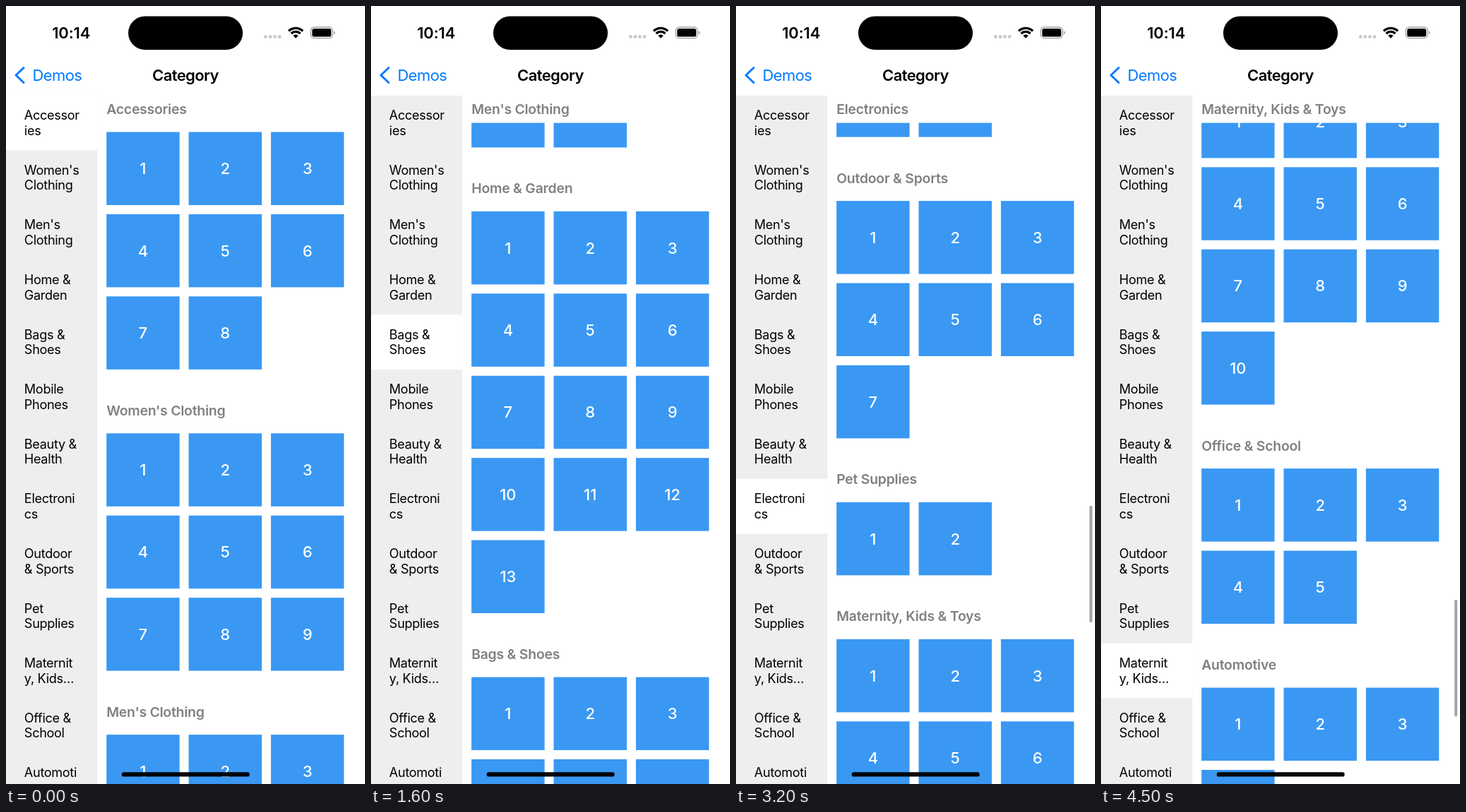
Recreate the animation shown at these times as an HTML page. Size 508 by 1102 pixels, loop 4600 ms.

```html
<!DOCTYPE html>
<html lang="en">
<head>
<meta charset="utf-8">
<title>Category</title>
<style>
  html, body { margin: 0; width: 100%; height: 100%; overflow: hidden; background: #fff; }
  svg { display: block; width: 508px; height: 1102px; }
  text { font-family: Inter, "Liberation Sans", sans-serif; }
  .tile { fill: #3a98f3; }
  .num { font-size: 17px; font-weight: 500; fill: #fff; text-anchor: middle; }
  .head { font-size: 15px; font-weight: 600; fill: #808080; letter-spacing: -.17px; }
  .side { font-size: 14px; letter-spacing: -.25px; }
  .nav { font-size: 17px; letter-spacing: -.43px; }
  .bold { font-weight: 600; text-anchor: middle; }
  .clock { letter-spacing: -.1px; }
</style>
</head>
<body>
<svg viewBox="0 0 508 1102">
  <g id="app">
    <g id="tiles"></g>
    <g id="heads"></g>
    <rect y="98" width="100" height="754" fill="#eee"/>
    <rect id="picked" width="100" height="60" fill="#fff"/>
    <g id="side"></g>
    <rect width="393" height="98" fill="#fff"/>
    <text class="nav" x="29" y="82" fill="#007aff">Demos</text>
    <text class="nav bold" x="196.5" y="82">Category</text>
    <text class="nav bold clock" x="71.3" y="35.3">10:14</text>
  </g>
  <path d="M25 87.5 14 98l11 10.5" fill="none" stroke="#007aff" stroke-width="3" stroke-linecap="round" stroke-linejoin="round"/>
  <rect x="173" y="14.5" width="162" height="47.5" rx="23.7"/>
  <path d="M367.3 43.5h20" stroke="#c8c8cc" stroke-width="4.8" stroke-dasharray="0 6.6" stroke-linecap="round"/>
  <g fill="none" stroke="#000" stroke-width="3.3">
    <path d="M400 35.5a14.2 14.2 0 0 1 20 0"/>
    <path d="M403.6 39.1a9 9 0 0 1 12.8 0"/>
  </g>
  <path d="M410 45.7l-3.6-3.6a5.1 5.1 0 0 1 7.2 0z"/>
  <rect x="431.2" y="30" width="31" height="15.6" rx="5" fill="none" stroke="#a0a0a0" stroke-width="1.3"/>
  <rect x="433.2" y="32" width="27" height="11.6" rx="3.2"/>
  <path d="M463.8 35.3q2 .8 2 2.5t-2 2.5z" fill="#a0a0a0"/>
  <rect id="bar" x="500.2" width="4" height="165.5" rx="2" fill="#a4a4a6"/>
  <rect x="163.7" y="1085.2" width="181" height="6.4" rx="3.2" fill="#000" fill-opacity=".97"/>
</svg>
<script>
// Layout is in points on a 393 x 852 screen, scaled to fill the stage.
const SCALE_X = 508 / 393, SCALE_Y = 1102 / 852, TOP = 98, LOOP = 4600, STEP = 100;
const $ = id => document.getElementById(id);
$('app').setAttribute('transform', `scale(${SCALE_X} ${SCALE_Y})`);

// title, item count, sidebar lines
const sections = [
  ['Accessories', 8, 'Accessor|ies'],
  ["Women's Clothing", 9, "Women's|Clothing"],
  ["Men's Clothing", 8, "Men's|Clothing"],
  ['Home & Garden', 13, 'Home &|Garden'],
  ['Bags & Shoes', 7, 'Bags &|Shoes'],
  ['Mobile Phones', 4, 'Mobile|Phones'],
  ['Beauty & Health', 5, 'Beauty &|Health'],
  ['Electronics', 5, 'Electroni|cs'],
  ['Outdoor & Sports', 7, 'Outdoor|& Sports'],
  ['Pet Supplies', 2, 'Pet|Supplies'],
  ['Maternity, Kids & Toys', 10, 'Maternit|y, Kids…'],
  ['Office & School', 5, 'Office &|School'],
  ['Automotive', 4, 'Automoti|ve'],
].map(([title, count, lines]) => ({ title, count, lines: lines.split('|') }));

function add(parent, tag, attrs, text = '') {
  const el = document.createElementNS('http://www.w3.org/2000/svg', tag);
  for (const key in attrs) el.setAttribute(key, attrs[key]);
  el.textContent = text;
  return parent.appendChild(el);
}

let y = 0;
sections.forEach((s, i) => {
  s.start = y;
  for (let n = 0; n < s.count; n++) {
    const tx = 110 + n % 3 * 90, ty = y + 40 + Math.floor(n / 3) * 90;
    add($('tiles'), 'rect', { class: 'tile', x: tx, y: ty, width: 80, height: 80 });
    add($('tiles'), 'text', { class: 'num', x: tx + 40, y: ty + 46.1 }, n + 1);
  }
  y += 60 + Math.ceil(s.count / 3) * 90;
  s.end = y;

  // The white backing reaches slightly under the navigation bar to avoid a seam.
  s.head = add($('heads'), 'g', {});
  add(s.head, 'rect', { x: 100, y: -2, width: 293, height: 32, fill: '#fff' });
  add(s.head, 'text', { class: 'head', x: 110, y: 20.3 }, s.title);

  s.lines.forEach((line, k) =>
    add($('side'), 'text', { class: 'side', x: 20, y: TOP + 60 * i + 26.6 + 16.7 * k }, line));
});

const MENS = 2, BAGS = 4, DRAG = 2500, RELEASE = 2880;

function ease(t, from, length) {
  const u = Math.min(1, Math.max(0, (t - from) / length));
  return u * u * (3 - 2 * u);
}

// Pixels travelled by the finger drag, then by the slowing fling.
function flick(t) {
  if (t <= DRAG) return 0;
  if (t < RELEASE) return 273.3 * ((t - DRAG) / 300) ** 2.56;
  return 2108.5 - 848 * Math.exp((3200 - t) / 500);
}

function draw(t) {
  const mens = sections[MENS].start, bags = sections[BAGS].start, moved = flick(t);
  const offset = mens * ease(t, 260, 450) + (bags - mens) * ease(t, 1440, 450) + moved / SCALE_Y;

  // A tap selects its row at once; a drag selects the section at the top.
  const picked = t < 300 ? 0 : t < 1500 ? MENS : t <= DRAG ? BAGS
    : sections.findIndex(s => offset < s.end);

  $('tiles').setAttribute('transform', `translate(0 ${TOP - offset})`);
  for (const s of sections) {
    const pinned = Math.min(Math.max(s.start - offset, 0), s.end - offset - 30);
    s.head.setAttribute('transform', `translate(0 ${TOP + pinned})`);
  }
  $('picked').setAttribute('y', TOP + 60 * picked);
  $('bar').setAttribute('y', 540 + (moved - 273.3) / 5.887);
  $('bar').setAttribute('visibility', moved ? 'visible' : 'hidden');
}

const began = performance.now();
function tick() {
  const t = (performance.now() - began) % LOOP;
  draw(Math.floor(t / STEP) * STEP);   // ten pictures a second
  requestAnimationFrame(tick);
}
tick();
</script>
</body>
</html>
```
